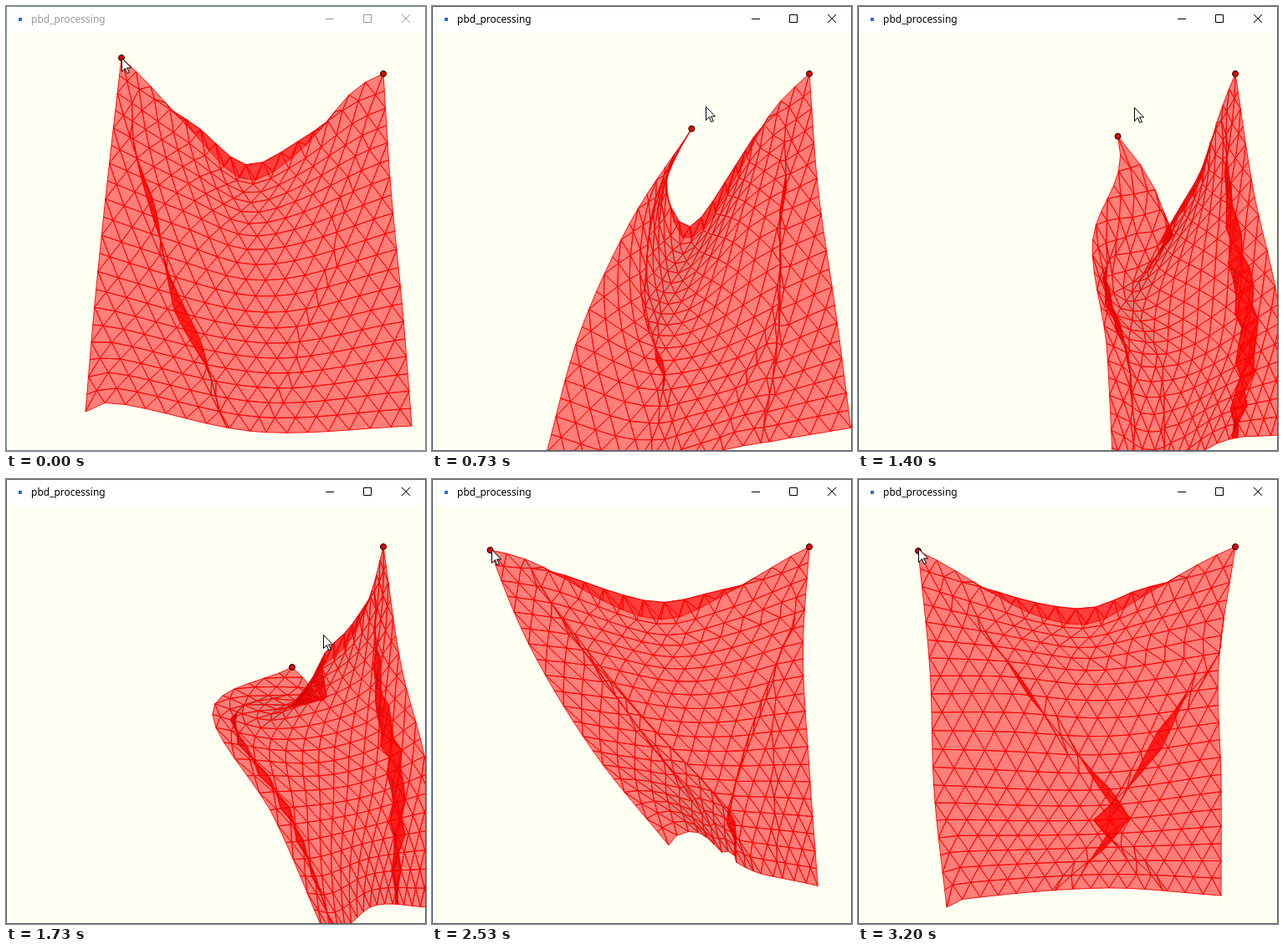
These frames come from a looping animation (502 px wide and 532 px high, 3.27 s). An HTML page with a canvas:

```html
<!DOCTYPE html>
<html lang="en">
<head>
<meta charset="utf-8">
<title>pbd_processing</title>
<style>
html, body { margin: 0; width: 100%; height: 100%; overflow: hidden; background: #fffff2; }
canvas { position: absolute; left: 0; top: 0; }
#title { position: absolute; left: 30px; top: 7px; font: 12px/17px "Noto Sans", "Open Sans", sans-serif; white-space: pre; }
</style>
</head>
<body>
<canvas id="stage" width="502" height="532"></canvas>
<div id="title">pbd_processing</div>
<script>
const LOOP = 3270, STEP = 200 / 3;
const COLS = 17, ROWS = 20, REST = 247;
const anchor = [451, 81];
const ctx = document.getElementById('stage').getContext('2d');
const title = document.getElementById('title');

// Smooth curve through keys [[t, [values]], ...] with uneven spacing.
function curve(keys, t) {
  const last = keys.length - 1;
  if (t <= keys[0][0]) return keys[0][1];
  if (t >= keys[last][0]) return keys[last][1];
  let i = 0;
  while (t > keys[i + 1][0]) i++;
  const [ta, a] = keys[i], [tb, b] = keys[i + 1];
  const [tp, p] = keys[Math.max(0, i - 1)], [tn, n] = keys[Math.min(last, i + 2)];
  const h = tb - ta, s = (t - ta) / h, w = s * s * (3 - 2 * s);
  const ka = h / (tb - tp) * s * (1 - s) ** 2, kb = h / (tn - ta) * s * s * (s - 1);
  return a.map((v, j) => v + (b[j] - v) * w + (b[j] - p[j]) * ka + (n[j] - v) * kb);
}

// Flat x, y list to curve keys spaced by distance, 0 to 1.
function thread(xy) {
  const keys = [];
  let d = 0;
  for (let i = 0; i < xy.length; i += 2) {
    if (i) d += Math.hypot(xy[i] - xy[i - 2], xy[i + 1] - xy[i - 1]);
    keys.push([d, [xy[i], xy[i + 1]]]);
  }
  return keys.map(([k, p]) => [k / d, p]);
}

// Cloth nodes: odd rows are shifted half a cell.
const nodes = [], rowStart = [];
for (let r = 0; r <= ROWS; r++) {
  const odd = r % 2;
  rowStart.push(nodes.length);
  for (let c = 0; c <= COLS + odd; c++)
    nodes.push([Math.min(1, Math.max(0, (c - odd / 2) / COLS)), r / ROWS]);
}

const tris = [];
for (let r = 0; r < ROWS; r++) {
  const e = rowStart[r + r % 2], o = rowStart[r + 1 - r % 2];
  for (let c = 0; c <= COLS; c++) {
    tris.push([e + c, o + c, o + c + 1, c % COLS ? REST : REST / 2]);
    if (c < COLS) tris.push([e + c, e + c + 1, o + c + 1, REST]);
  }
}

// Position along a row once the pleats double it back.
function pleat(u, v, folds) {
  const at = x => folds.reduce((sum, [top, bottom, size]) => {
    const h = size * Math.sin(2.6 * v), from = top + (bottom - top) * v - h;
    return sum - 2 * Math.min(2 * h, Math.max(0, x - from));
  }, x);
  return (at(u) - at(0)) / (at(1) - at(0));
}

// The hem along the top edge turns over between the pins.
function hem(u, v) {
  return v < 0.06 ? v + (0.08 - 2.6 * v) * Math.sin(Math.PI * u) ** 2 : v;
}

const poses = [], pinPath = [];

// Rows at heights 0, 1/3, 2/3 and 1; folds are [u at top, u at bottom, size].
function pose(t, top, upper, lower, bottom, ...folds) {
  const rows = [top.concat(anchor), upper, lower, bottom].map(thread);
  pinPath.push([t, top.slice(0, 2)]);
  poses.push([t, nodes.flatMap(([u, v]) => {
    const p = pleat(u, v, folds);
    return curve(rows.map((row, i) => [i / 3, curve(row, p)]), hem(u, v));
  })]);
}

pose(0, [138,62, 226,137, 288,190, 350,157, 415,98],
  [122,202, 210,238, 300,270, 460,219], [107,346, 310,391, 474,363],
  [95,485, 125,474, 300,509, 485,502], [.02, .45, .025], [.98, .58, .006]);
pose(470, [228,116, 206,168, 281,210, 358,150, 405,108],
  [150,230, 285,283, 370,240, 456,222], [114,373, 290,388, 474,364],
  [97,522, 250,524, 357,525, 492,503], [0, .45, .02], [.98, .55, .012]);
pose(1000, [391,162, 350,248, 343,300, 385,210, 405,140],
  [320,272, 315,390, 395,280, 468,218], [246,404, 330,465, 492,365],
  [195,540, 290,585, 396,525, 508,506], [.3, .3, .02], [.9, .72, .04]);
pose(1730, [342,225, 388,262, 378,215, 412,175, 440,117],
  [247,277, 320,295, 425,270, 472,222], [319,402, 420,388, 505,360],
  [377,535, 400,540, 440,510, 505,512], [.12, .12, .025], [.85, .72, .045]);
pose(2270, [74,85, 142,95, 248,137, 300,143, 390,115],
  [153,199, 240,225, 330,240, 450,205], [252,308, 350,332, 469,335],
  [352,400, 385,388, 410,450, 490,476], [.12, .4, .05], [.97, .8, .015]);
pose(2800, [72,86, 148,120, 215,147, 280,156, 345,125],
  [94,228, 170,225, 285,240, 438,215], [137,368, 290,372, 436,365],
  [197,498, 207,483, 310,484, 432,502], [.1, .65, .025], [1.1, .5, .025]);
pose(3200, [72,86, 148,120, 215,147, 278,154, 340,125],
  [86,228, 180,230, 285,240, 431,222], [91,373, 290,378, 434,360],
  [106,512, 120,503, 295,489, 434,498], [.04, .78, .022], [1.2, .4, .025]);

// The pin swings in a loop and then flies back left.
pinPath.push([1200, [385, 98]], [1530, [276, 200]], [1930, [315, 140]], [2130, [108, 90]]);
pinPath.sort((a, b) => a[0] - b[0]);

// Pointer offset from the dragged pin.
const lead = [[0, [0, 0]], [470, [26, -1]], [1000, [1, -53]], [1150, [0, -32]],
  [1730, [37, -39]], [2130, [-16, 0]], [2270, [0, 1]], [2800, [0, -3]]];

function path(pts) {
  ctx.beginPath();
  pts.forEach(([x, y]) => ctx.lineTo(x, y));
  ctx.closePath();
}

function paint(fill, stroke) {
  ctx.fillStyle = fill;
  ctx.strokeStyle = stroke;
  ctx.fill();
  ctx.stroke();
}

function drawCloth(t, pin) {
  const flat = curve(poses, t);
  const dx = pin[0] - flat[0], dy = pin[1] - flat[1];
  const pts = nodes.map(([u, v], i) => {
    const w = Math.exp(-5 * (u + v)) * (1 - u);
    return [flat[2 * i] + dx * w, flat[2 * i + 1] + dy * w];
  });
  ctx.lineWidth = 0.9;
  ctx.lineJoin = 'bevel';
  for (const [i, j, k, rest] of tris) {
    const a = pts[i], b = pts[j], c = pts[k];
    const area = Math.abs((b[0] - a[0]) * (c[1] - a[1]) - (c[0] - a[0]) * (b[1] - a[1])) / 2;
    const light = Math.min(1, 0.5 + 0.9 * area / rest);
    path([a, b, c]);
    paint(`rgba(${Math.round(255 * light)},0,0,.5)`, '#f00');
  }
  ctx.lineWidth = 1;
}

function drawPin([x, y]) {
  ctx.beginPath();
  ctx.arc(x, y, 3.5, 0, 2 * Math.PI);
  paint('#e00', '#000');
}

function drawMouse(x, y) {
  const arrow = [[0, 0], [0, 16], [4, 12], [6, 18], [9, 17], [6, 11.5], [11, 11.5]];
  path(arrow.map(([ax, ay]) => [Math.round(x) + 0.5 + ax, Math.round(y) + 0.5 + ay]));
  paint('#fff', '#000');
}

function drawWindow(active) {
  const ink = active ? '#000' : '#999';
  title.style.color = ink;
  ctx.fillStyle = '#fff';
  ctx.fillRect(0, 0, 502, 32);
  ctx.fillStyle = '#2a6ae0';
  ctx.fillRect(15, 14, 4, 4);
  ctx.strokeStyle = ink;
  ctx.beginPath();
  ctx.moveTo(382, 15.5);
  ctx.lineTo(392, 15.5);
  ctx.rect(427.5, 10.5, 9, 9);
  ctx.moveTo(473, 10);
  ctx.lineTo(483, 20);
  ctx.moveTo(483, 10);
  ctx.lineTo(473, 20);
  ctx.stroke();
  ctx.strokeStyle = active ? '#4c5c66' : '#6f8794';
  ctx.strokeRect(0.5, 0.5, 501, 531);
}

function draw(now) {
  const step = Math.min(48, Math.floor((now % LOOP + 5) / STEP));
  const t = Math.round(step * STEP / 10) * 10;
  const pin = curve(pinPath, t), off = curve(lead, t);
  ctx.fillStyle = '#fffff2';
  ctx.fillRect(0, 0, 502, 532);
  drawCloth(t, pin);
  drawPin(anchor);
  drawPin(pin);
  drawMouse(pin[0] + off[0], pin[1] + off[1]);
  drawWindow(step > 0);
}

let start;
function tick(now) {
  if (start === undefined) start = now;
  draw(now - start);
  requestAnimationFrame(tick);
}
draw(0);
requestAnimationFrame(tick);
</script>
</body>
</html>
```
